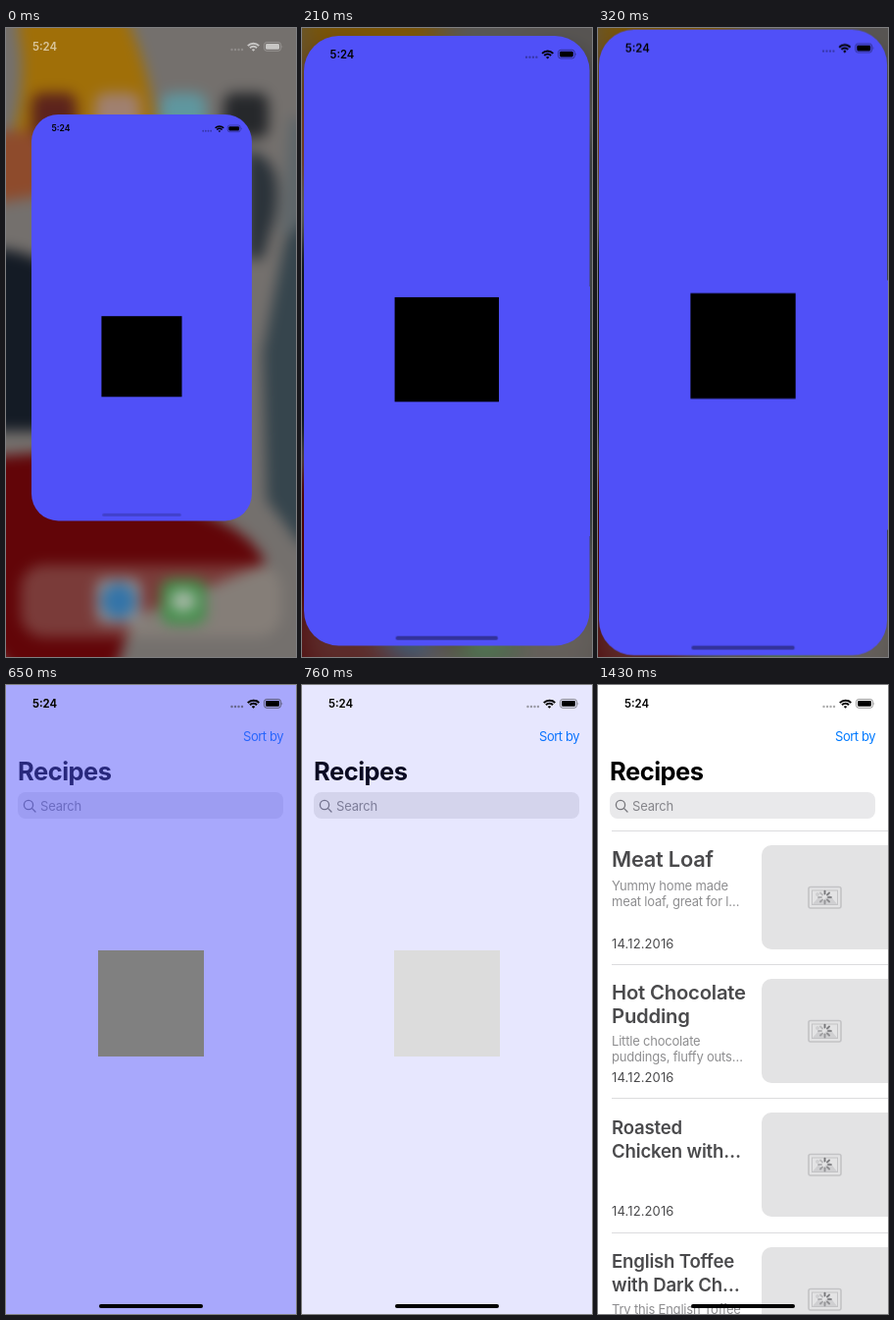
Write an HTML page that moves like this. It is 296 px wide and 640 px high and loops after 1510 ms.

```html
<!DOCTYPE html>
<html lang="en">
<head>
<meta charset="utf-8">
<title>Recipes launch</title>
<style>
  html, body { margin: 0; width: 100%; height: 100%; overflow: hidden; background: #fff; }
  body { position: relative; font: 13px/16px Inter, "Liberation Sans", sans-serif; letter-spacing: -.2px; }
  #stage { position: absolute; left: 0; top: 0; width: 296px; height: 640px; overflow: hidden; }
  #stage div, #stage svg { position: absolute; white-space: nowrap; }
  .fill { left: 0; top: 0; width: 296px; height: 640px; }
  .wall, .home .status, .page, .system, .card, .card .bar, .list { animation: 1510ms step-end infinite; }

  .home { background: #57524e; overflow: hidden; }
  .wall { overflow: visible; transform-origin: 50% 50%; animation-name: wall; }
  .home .status { color: #fff; animation-name: dim; }
  .home .status .status { animation: none; }

  .status { left: 0; top: 0; width: 296px; height: 40px; color: #000; }
  .status b { position: absolute; left: 27px; top: 11px; font-weight: 600; font-size: 11.4px; letter-spacing: 0; }
  .bar { left: 95px; bottom: 6px; width: 106px; height: 4px; border-radius: 2px; background: #000; }

  .page { background: #fff; animation-name: appear; }
  .sort { right: 13px; top: 44px; color: #007aff; letter-spacing: -.45px; }
  .title { left: 12px; top: 72px; font: 700 25.5px/32px Inter, sans-serif; letter-spacing: -.5px; }
  .search { left: 12px; top: 109px; width: 271px; height: 27px; border-radius: 8px; background: #e9e9eb; color: #85858a; }
  .search span { position: absolute; left: 23px; top: 6px; }

  .card {
    left: 0; top: 0; width: 296px; height: 640px; overflow: hidden;
    background: #5050f8; transform-origin: 0 0; animation-name: launch;
  }
  .card .bar { animation-name: settle; }
  .logo { left: 94px; top: 270px; width: 108px; height: 108px; background: #000; }
  .system { animation-name: appear; }

  .list { animation-name: load; }
  .row { left: 14px; width: 282px; height: 136px; border-top: 1px solid #dcdcde; }
  .name { left: 0; color: #4a4a4c; font-weight: 600; letter-spacing: -.01em; }
  .note { left: 0; color: #8e8e90; }
  .date { left: 0; top: 106px; color: #4a4a4c; letter-spacing: .12px; }
  .thumb { left: 153px; top: 14px; width: 129px; height: 106px; border-radius: 10px 0 0 10px; background: #e3e3e4; }

  @keyframes launch {
    0% { transform: translate(26px, 88px) scale(.76); height: 544px; border-radius: 36px; opacity: 1; }
    7.284% { transform: translate(7.5px, 27px) scale(.932); height: 615px; border-radius: 36px; opacity: 1; }
    13.907% { transform: translate(2px, 8px) scale(.985); height: 630px; border-radius: 36px; opacity: 1; }
    21.192% { transform: translate(1px, 1.6px) scale(.9935); height: 640.5px; border-radius: 36px; opacity: 1; }
    27.814% { transform: translate(0, .4px) scale(1); height: 639.3px; border-radius: 36px; opacity: 1; }
    35.761% { transform: none; height: 640px; border-radius: 0; opacity: .86; }
    43.046% { transform: none; height: 640px; border-radius: 0; opacity: .5; }
    50.331% { transform: none; height: 640px; border-radius: 0; opacity: .14; }
    57.615%, 100% { transform: none; height: 640px; border-radius: 0; opacity: 0; }
  }
  @keyframes settle {
    0% { opacity: .18; }
    7.284%, 100% { opacity: .38; }
  }
  @keyframes wall {
    0% { filter: blur(7px); transform: none; }
    7.284% { filter: blur(11px) brightness(.84); transform: scale(1.1); }
    13.907%, 100% { filter: blur(14px) brightness(.76); transform: scale(1.14); }
  }
  @keyframes dim {
    0% { opacity: .6; }
    7.284% { opacity: .2; }
    13.907%, 100% { opacity: 0; }
  }
  @keyframes appear {
    0% { visibility: hidden; }
    35.761%, 100% { visibility: visible; }
  }
  @keyframes load {
    0% { opacity: 0; }
    94.701%, 100% { opacity: 1; }
  }
</style>
</head>
<body>
<svg width="0" height="0" style="position:absolute">
  <symbol id="signals" viewBox="0 0 296 40">
    <g fill="currentColor">
      <path d="M230.5 22H243" stroke="currentColor" stroke-width="2.4" stroke-linecap="round" stroke-dasharray="0 3.5" opacity=".32"/>
      <path d="M252.5 23.8L250.8 22.1A2.4 2.4 0 0 1 254.2 22.1Z"/>
      <path d="M246.8 18.1A8 8 0 0 1 258.2 18.1M249 20.3A4.9 4.9 0 0 1 256 20.3" fill="none" stroke="currentColor" stroke-width="2"/>
      <rect x="263.5" y="14.5" width="17" height="8.8" rx="2.6" fill="none" stroke="currentColor" opacity=".4"/>
      <path d="M281.6 17.4q1.4 1.5 0 3z" opacity=".45"/>
      <rect x="265" y="16" width="14" height="5.8" rx="1.4"/>
    </g>
  </symbol>
  <symbol id="picture" viewBox="0 0 129 106">
    <g fill="none" stroke="#c3c3c5" stroke-width="1.6">
      <rect x="48" y="42.5" width="33" height="21.5" rx="2"/>
      <rect x="51.5" y="46" width="26" height="14.5" stroke-width="1"/>
    </g>
    <path d="M52 60L58 53 62 57 69 50 77 60Z" fill="#cfcfd1"/>
    <circle cx="57" cy="50" r="2" fill="#cfcfd1"/>
    <g id="spokes" stroke="#77777a" stroke-width="1.9" stroke-linecap="round"></g>
  </symbol>
</svg>

<div id="stage">
  <div class="home fill">
    <svg class="wall" width="296" height="640" viewBox="0 0 296 640">
      <rect x="-60" y="-60" width="416" height="760" fill="#74706d"/>
      <path d="M30 -60H95Q150 20 156 130H0Q25 60 12 0Z" fill="#a06f08"/>
      <path d="M-60 105H40V170L-60 185Z" fill="#8e4b2c"/>
      <path d="M-60 225Q10 215 60 250V410H-60Z" fill="#141b25"/>
      <path d="M-60 440L60 430 190 490Q250 510 265 545L130 600 95 700H45L-60 575Z" fill="#620508"/>
      <path d="M245 125Q285 130 275 190L262 235H245Z" fill="#2b333a"/>
      <path d="M356 110L290 90 280 210H356Z" fill="#5e666a"/>
      <path d="M356 150L285 215 262 330 266 480 300 525H356Z" fill="#36454d"/>
      <rect x="15" y="546" width="266" height="74" rx="24" fill="#a09488" opacity=".38"/>
      <rect x="26" y="66" width="46" height="46" rx="11" fill="#5c231c"/>
      <rect x="91" y="66" width="46" height="46" rx="11" fill="#a08070"/>
      <rect x="158" y="66" width="46" height="46" rx="11" fill="#5f979f"/>
      <rect x="222" y="66" width="46" height="46" rx="11" fill="#26282b"/>
      <rect x="92" y="560" width="46" height="46" rx="11" fill="#8d8f92"/>
      <circle cx="115" cy="583" r="18" fill="#3474a8"/>
      <rect x="158" y="561" width="46" height="46" rx="11" fill="#438f4b"/>
      <ellipse cx="181" cy="583" rx="13" ry="11" fill="#a6b8a6"/>
    </svg>
    <div class="status"><b>5:24</b><svg class="status" style="color:inherit"><use href="#signals" width="296" height="40"/></svg></div>
  </div>

  <div class="page fill">
    <div class="sort">Sort by</div>
    <div class="title">Recipes</div>
    <div class="search">
      <svg width="24" height="27" fill="none" stroke="#77777c" stroke-width="1.3" stroke-linecap="round">
        <circle cx="11" cy="13" r="4.6"/><path d="M14.4 16.4L18 20"/>
      </svg>
      <span>Search</span>
    </div>
    <div class="list fill" id="list"></div>
  </div>

  <div class="card">
    <div class="logo"></div>
    <div class="status"><b>5:24</b><svg class="status"><use href="#signals" width="296" height="40"/></svg></div>
    <div class="bar"></div>
  </div>

  <div class="system fill">
    <div class="status"><b>5:24</b><svg class="status"><use href="#signals" width="296" height="40"/></svg></div>
    <div class="bar"></div>
  </div>
</div>

<script>
  const recipes = [
    { size: 21.8, name: ["Meat Loaf"], note: ["Yummy home made", "meat loaf, great for l…"] },
    { size: 20.3, name: ["Hot Chocolate", "Pudding"], note: ["Little chocolate", "puddings, fluffy outs…"] },
    { size: 18.6, name: ["Roasted", "Chicken with…"], note: [] },
    { size: 18.6, name: ["English Toffee", "with Dark Ch…"], note: ["Try this English Toffee"] }
  ];

  const block = (cls, lines, top, size, lead) =>
    `<div class="${cls}" style="top:${top}px;font-size:${size}px;line-height:${lead}px">${lines.join("<br>")}</div>`;

  document.getElementById("list").innerHTML = recipes.map((r, i) => {
    const noteTop = 47 + (r.name.length - 1) * 22;
    return `<div class="row" style="top:${147.5 + i * 136.4}px">
      ${block("name", r.name, 16.5, r.size, 24)}
      ${block("note", r.note, noteTop, 13, 16)}
      <div class="date">14.12.2016</div>
      <svg class="thumb"><use href="#picture" width="129" height="106"/></svg>
    </div>`;
  }).join("");

  document.getElementById("spokes").innerHTML = Array.from({ length: 8 }, (_, i) =>
    `<path d="M64.5 49.5V46.6" transform="rotate(${i * 45} 64.5 53)" opacity="${1 - i * 0.09}"/>`).join("");
</script>
</body>
</html>
```
